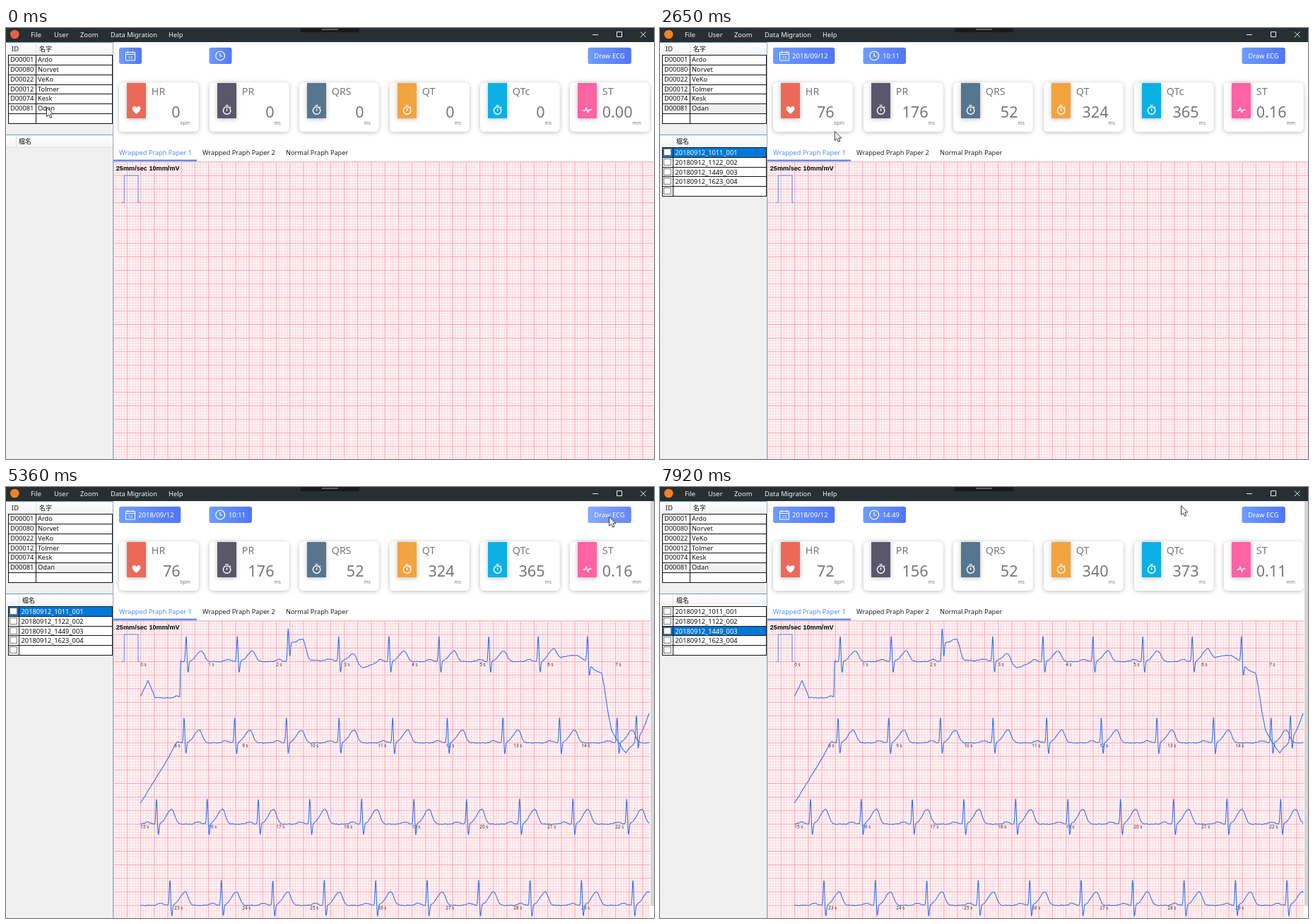
Recreate the animation shown at these times as an HTML page. Size 917 by 611 pixels, loop 7.99 s.

```html
<!DOCTYPE html>
<html lang="en">
<head>
<meta charset="utf-8">
<title>ECG viewer</title>
<style>
html, body { margin: 0; width: 100%; height: 100%; overflow: hidden; background: #fff; }
svg { display: block; width: 100%; height: 100%; }
text { font: 9.3px "Noto Sans", "Noto Sans CJK TC", "Noto Sans CJK", sans-serif; white-space: pre; }
</style>
</head>
<body>
<svg id="stage" viewBox="0 0 917 611" xmlns="http://www.w3.org/2000/svg"></svg>
<script>
const LOOP = 7990;
const SECOND = 96, MM = SECOND / 25;
const ROW_WIDTH = SECOND * 7.5, ROW_GAP = MM * 30, LEFT = 190.3;

const rect = (x, y, w, h, fill, more = '') =>
  `<rect x="${x}" y="${y}" width="${w}" height="${h}" fill="${fill}" ${more}/>`;
const path = (d, stroke, width = 1, more = '') =>
  `<path d="${d}" fill="none" stroke="${stroke}" stroke-width="${width}" ${more}/>`;
const text = (x, y, s, fill = '#111', size = 9.3, more = '') =>
  `<text x="${x}" y="${y}" fill="${fill}" style="font-size:${size}px" ${more}>${s}</text>`;
const repeat = (n, make) => Array.from({ length: n }, (_, i) => make(i)).join('');
// Visible from one time (ms) up to another.
const during = (from, to, body) => `<g data-from="${from}" data-to="${to}">${body}</g>`;

const gradient = (id, a, b, more = '') =>
  `<linearGradient id="${id}" ${more}><stop stop-color="${a}"/><stop offset="1" stop-color="${b}"/></linearGradient>`;
const defs = '<defs>' + gradient('blue', '#6d9dfe', '#5175f5') + gradient('hover', '#85abff', '#6886f6') +
  gradient('press', '#aac6ff', '#98adfa') + gradient('head', '#fff', '#f3f4f5', 'x2="0" y2="1"') +
  `<filter id="shadow" x="-20%" y="-20%" width="140%" height="150%">
    <feDropShadow dx="0" dy="1" stdDeviation="3.2" flood-color="#000" flood-opacity=".27"/></filter></defs>`;

function titleBar() {
  const menu = [[35, 'File'], [68, 'User'], [105, 'Zoom'], [148, 'Data Migration'], [230, 'Help']];
  return rect(0, 0, 917, 20, '#272f32') +
    '<circle id="logo" cx="12.3" cy="9" r="6.3"/>' +
    menu.map(([x, s]) => text(x, 12.5, s, '#f4f4f4', 9.4)).join('') +
    rect(417, 0, 83, 6, '#17191b') + rect(447, 1, 23, 2, '#5b5f61') +
    path('M830 9.5h8M864.5 5.5h7v7h-7zM898 5.5l7.5 7.5M905.5 5.5l-7.5 7.5', '#eee');
}

// Black table lines on whole pixels.
const table = (top, rows, columns) =>
  repeat(rows + 1, i => rect(3, top(i), 148, 1, '#111')) +
  columns.map(x => rect(x, top(0), 1, top(rows) - top(0) + 1, '#111')).join('');

function patientList() {
  const people = [['D00001', 'Ardo'], ['D00080', 'Norvet'], ['D00022', 'VeKo'],
    ['D00012', 'Tolmer'], ['D00074', 'Kesk'], ['D00081', 'Odan']];
  const top = i => Math.round(38 + i * 13.85);
  const person = (i, fill) =>
    text(6, top(i) + 10.4, people[i][0], fill) + text(45, top(i) + 10.4, people[i][1], fill);
  return rect(0, 20, 152, 591, '#f0f0f0') + rect(0, 20, 152, 18, 'url(#head)') +
    rect(0, 20, 151, 1, '#7d9db9') + rect(42, 23, 1, 14, '#ddd') +
    text(8, 33, 'ID') + text(47, 33, '名字', '#111', 9) +
    rect(3, 38, 148, 97, '#fff') +
    during(2100, LOOP, rect(3, top(5), 148, 14, '#f0f0f0')) +
    repeat(people.length, i => person(i, '#111')) +
    during(460, 2100, rect(3, top(5), 148, 14, '#0078d7') + person(5, '#fff')) +
    table(top, 7, [3, 42, 150]);
}

function fileList() {
  const files = ['20180912_1011_001', '20180912_1122_002', '20180912_1449_003', '20180912_1623_004'];
  const top = i => Math.round(169 + i * 13.8);
  const file = (i, fill) => text(21.5, top(i) + 10.6, files[i], fill);
  const selected = i => rect(4, top(i), 147, 14, '#0078d7') + file(i, '#fff');
  const header = (line, x) => rect(line, 153, 1, 15, '#ddd') + text(x, 164, '檔名', '#111', 9);
  return rect(0, 152, 152, 17, 'url(#head)') + rect(0, 151, 151, 1, '#6f97b8') +
    during(0, 460, header(14, 18) + rect(0, 169, 151, 1, '#dcdcdc')) +
    during(460, LOOP, header(18, 23) + rect(3, 169, 148, 69, '#fff') +
      repeat(files.length, i => file(i, '#111')) +
      during(2100, 7300, selected(0)) + during(7300, LOOP, selected(2)) +
      repeat(5, i => rect(5.5, top(i) + 2.5, 10, 9, '#fff', 'stroke="#777"')) +
      table(top, 5, [3, 18, 150])) +
    rect(151, 20, 1, 591, '#98a8bb');
}

function buttons() {
  const button = (id, x, w) => rect(x, 27.7, w, 23.3, 'url(#blue)', `id="${id}" rx="3"`);
  return button('dateBox', 160, 32) + button('timeBox', 287.5, 32) + button('draw', 823.5, 61.3) +
    path('M169.5 34.5h13v11.5h-13zM169.5 37.4h13M172.5 32.6v3M179.5 32.6v3', '#fff', 1) +
    text(176, 44.2, '15', '#fff', 6, 'text-anchor="middle"') +
    '<circle cx="303.2" cy="39.4" r="6.4" fill="none" stroke="#fff" stroke-width="1.2"/>' +
    path('M303 35.5V40H306.5', '#fff', 1.2) +
    text(187, 43, '', '#fff', 9.55, 'id="date"') + text(315, 43, '', '#fff', 9.3, 'id="time"') +
    text(832.3, 43, 'Draw ECG', '#fff', 9.4);
}

function cards() {
  const kinds = [['HR', 'bpm', '#ec6959'], ['PR', 'ms', '#5c566b'], ['QRS', 'ms', '#56748f'],
    ['QT', 'ms', '#f3a440'], ['QTc', 'ms', '#0ab0e4'], ['ST', 'mm', '#fe64a3']];
  const unitWidth = { bpm: 13.8, ms: 9, mm: 12 };
  const heart = '<path d="M0 6C-8 0-6.5-5-3.3-5-1.3-5 0-3 0-2.6 0-3 1.3-5 3.3-5 6.5-5 8 0 0 6Z" fill="#fff"/>';
  const watch = '<circle cy="1" r="5.2" fill="none" stroke="#fff" stroke-width="1.4"/>' +
    path('M-2-6.4H2M0-1.8V1.8M4.2-4.4L5.4-3.2', '#fff', 1.4);
  const pulse = path('M-6 1H-3.2L-1.6-3 .8 4 2.5 0H6', '#fff', 1.3, 'stroke-linejoin="round"');
  const icons = { HR: heart, ST: pulse };
  return kinds.map(([name, unit, color], i) => {
    const x = Math.round(160 + i * 127.65);
    const right = x + 100.5 - unitWidth[unit];
    return rect(x, 77.5, 112.5, 69.5, '#fff', 'rx="6" filter="url(#shadow)"') +
      rect(x + 11, 78, 27, 50, color, 'filter="url(#shadow)"') +
      `<g transform="translate(${x + 24.6} 116)">${icons[name] || watch}</g>` +
      text(x + 45.8, 95.3, name, '#777', 14.3) +
      text(right, 126.7, '', '#777', 21.6, 'class="value" text-anchor="end"') +
      text(right, 136.8, unit, '#777', 6.6);
  }).join('');
}

function tabsAndPaper() {
  const grid = step => {
    let d = '';
    for (let x = 152.2; x < 917; x += step) d += `M${x.toFixed(2)} 190V611`;
    for (let y = 190; y < 611; y += step) d += `M152 ${y.toFixed(2)}H917`;
    return d;
  };
  return text(160, 180, 'Wrapped Praph Paper 1', '#568af5', 9.2) +
    text(278, 180, 'Wrapped Praph Paper 2', '#222', 9.2) +
    text(396, 180, 'Normal Praph Paper', '#222', 9.2) +
    path('M152 189.3H917', '#e6e3e8') + rect(152, 186.6, 118, 2.4, '#5a8cf6') +
    rect(152, 190, 765, 421, '#fff7f8') +
    path(grid(MM), '#ffd0d8', .75) + path(grid(MM * 5), '#fbaebb', 1.1) +
    `<text x="155.8" y="202" style="font:bold 9.15px 'Liberation Sans',Arial,sans-serif">25mm/sec 10mm/mV</text>` +
    path('M163.5 247.3H167.3V209H187V247.3H190', '#5b95ee', 1.1);
}

// Beat i of a row sits at first + gap * i + slowing * i²; drift holds the baseline's key points.
const rows = [
  { first: 255, gap: 72.5, slowing: -.19, tWave: 15,
    drift: [[190, 50], [201, 27], [211, 51], [246, 52], [247, 0], [397, 0], [403, -28], [420, -17], [428, -2],
      [480, 0], [505, 9], [530, 0], [760, 0], [800, -9], [823, 0], [843, 32], [857, 98], [877, 132], [911, 86]] },
  { first: 252, gap: 71, slowing: .7, tWave: 18, drift: [[190, 86], [243, 0], [911, 0]] },
  { first: 213, gap: 71.5, slowing: .27, tWave: 21, drift: [[190, 0], [911, 0]] },
  { first: 232, gap: 72.8, slowing: 0, tWave: 19, drift: [[190, 0], [911, 0]] }
];

const bell = (d, width) => Math.exp(-d * d / (2 * width * width));

function driftAt(points, x) {
  const i = points.findIndex(p => p[0] >= x);
  const [[x0, y0], [x1, y1]] = points.slice(i - 1, i + 1);
  return y0 + (y1 - y0) * (x - x0) / (x1 - x0);
}

// P wave, R peak, S dip and T wave at a distance from the R peak.
const beat = (d, tWave) =>
  -3 * bell(d + 13, 4) - 36 * bell(d, .9) + 16 * bell(d - 2.6, .95) - tWave * bell(d - 21.5, d < 21.5 ? 7 : 4.2);

function trace({ first, gap, slowing, tWave, drift }, row) {
  let d = '';
  for (let x = LEFT; x <= LEFT + ROW_WIDTH; x += .5) {
    let y = 247.5 + row * ROW_GAP + driftAt(drift, x) + .5 * Math.sin(x * .71) * Math.sin(x * .23);
    for (let i = 0; i < 10; i++) y += beat(x - first - gap * i - slowing * i * i, tWave);
    d += `${d ? 'L' : 'M'}${x.toFixed(1)} ${y.toFixed(1)}`;
  }
  return path(d, '#2a6df4', 1.05, 'stroke-linejoin="round"');
}

function ecg() {
  const label = i => {
    const row = Math.floor(i / 7.5);
    return text(LEFT + i * SECOND - row * ROW_WIDTH, 253.8 + row * ROW_GAP, i + ' s', '#333', 6.3);
  };
  return during(4270, LOOP, repeat(30, label) + rows.map(trace).join('') +
    rect(911.5, 20, 5.5, 591, '#fff') + rect(912, 20, 5, 574, '#d5d6d9', 'id="thumb"'));
}

const stage = document.getElementById('stage');
stage.innerHTML = defs + rect(152, 20, 765, 591, '#fff') + tabsAndPaper() + cards() + buttons() + ecg() +
  patientList() + fileList() + titleBar() +
  `<circle id="click" r="9.2" fill="#ff0" fill-opacity=".47"/>
  <path id="cursor" d="M.5.5V13.6L3.5 10.8 5.6 15.4 7.8 14.4 5.8 10H9.8Z" fill="#fff" stroke="#222" stroke-width=".9"/>`;

const $ = id => document.getElementById(id);
const timed = [...stage.querySelectorAll('[data-from]')];
const values = [...stage.querySelectorAll('.value')];

const readings = [
  { from: 0, date: '', time: '', values: ['0', '0', '0', '0', '0', '0.00'] },
  { from: 2100, date: '2018/09/12', time: '10:11', values: ['76', '176', '52', '324', '365', '0.16'] },
  { from: 7300, date: '2018/09/12', time: '14:49', values: ['72', '156', '52', '340', '373', '0.11'] }
];
const clicks = [[310, 460], [1700, 1870], [4040, 4120], [6910, 6980]];

const easeInOut = u => u * u * u * (10 - 15 * u + 6 * u * u);
const easeOut = u => 1 - (1 - u) ** 2.75;

// The pointer jumps in even steps between the first and last time of each move.
const moves = [
  { start: 80, end: 80, steps: 1, to: [56, 115] },
  { start: 770, end: 1000, steps: 4, to: [68, 189] },
  { start: 1170, end: 1240, steps: 2, to: [65, 179] },
  { start: 1470, end: 1470, steps: 1, to: [65, 177] },
  { start: 2650, end: 3420, steps: 11, to: [854, 43], ease: easeOut },
  { start: 3490, end: 3570, steps: 2, to: [857.5, 41] },
  { start: 5360, end: 6140, steps: 11, to: [189, 143] },
  { start: 6220, end: 6450, steps: 4, to: [19, 202] },
  { start: 6520, end: 6600, steps: 2, to: [53, 203] },
  { start: 7680, end: 7920, steps: 4, to: [737, 26] }
];

function pointer(t) {
  let [x, y] = [57, 112];
  for (const { start, end, steps, to, ease = easeInOut } of moves) {
    if (t < start) break;
    const interval = (end - start) / (steps - 1 || 1) || 1;
    const step = Math.min(steps, Math.floor((t - start) / interval + 1e-6) + 1);
    const u = ease(step / steps);
    x += (to[0] - x) * u;
    y += (to[1] - y) * u;
  }
  return [x, y];
}

function draw(t) {
  for (const el of timed)
    el.style.display = t >= +el.dataset.from && t < +el.dataset.to ? '' : 'none';

  const now = readings.filter(r => r.from <= t).pop();
  values.forEach((el, i) => { el.textContent = now.values[i]; });
  $('date').textContent = now.date;
  $('time').textContent = now.time;
  $('dateBox').setAttribute('width', now.date ? 87.3 : 32);
  $('timeBox').setAttribute('width', now.time ? 60.5 : 32);
  $('logo').setAttribute('fill', t < 460 ? '#e9603f' : '#f58220');

  const [x, y] = pointer(t);
  const over = x > 823 && x < 885 && y > 27 && y < 51;
  const pressed = t >= 4040 && t < 4270;
  $('draw').setAttribute('fill', `url(#${pressed ? 'press' : over ? 'hover' : 'blue'})`);
  $('thumb').setAttribute('fill', x > 152 ? '#d5d6d9' : '#dfe0e2');
  $('cursor').setAttribute('transform', `translate(${x} ${y})`);
  $('click').setAttribute('transform', `translate(${x} ${y + .5})`);
  $('click').style.display = clicks.some(([a, b]) => t >= a && t < b) ? '' : 'none';
}

const begin = performance.now();
function frame() {
  draw((performance.now() - begin) % LOOP);
  requestAnimationFrame(frame);
}
frame();
</script>
</body>
</html>
```
